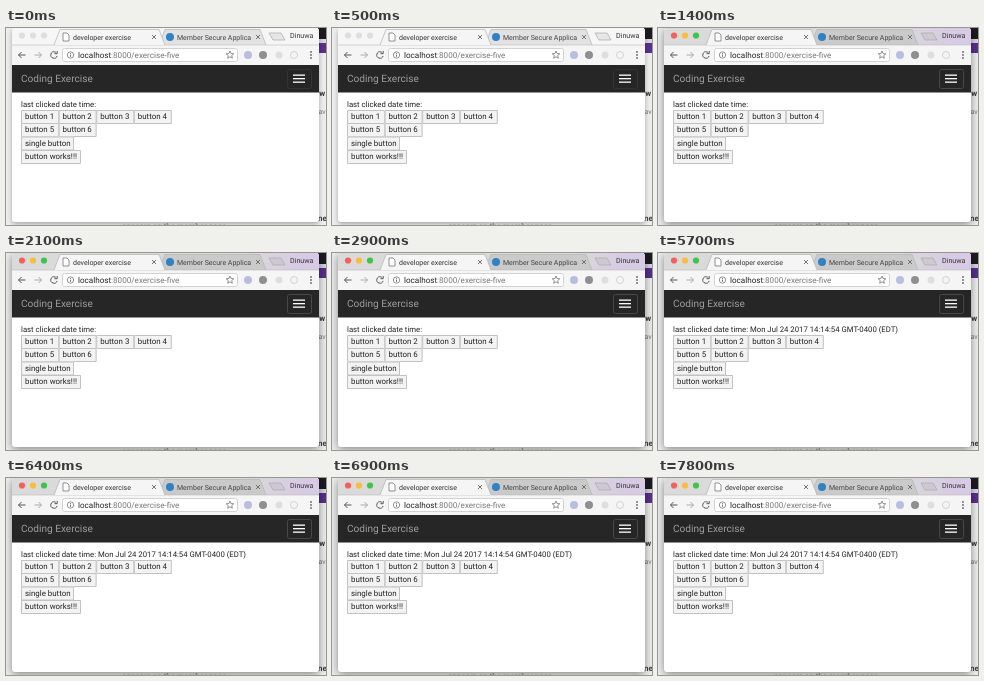
An HTML page with a canvas that plays this animation: 320x197 px, repeating every 8 s.

```html
<!DOCTYPE html>
<html lang="en">
<head>
<meta charset="utf-8">
<title>Coding Exercise</title>
<style>
html, body { margin: 0; width: 100%; height: 100%; overflow: hidden; background: #ddd; }
canvas { display: block; width: 320px; height: 197px; }
</style>
</head>
<body>
<canvas id="stage"></canvas>
<script>
const W = 320, H = 197, LOOP = 8000;
const FOCUS_AT = 1400, CLICK_AT = 4800;
const FONT = 'Roboto, "Liberation Sans", sans-serif';
const canvas = document.getElementById('stage');
const ctx = canvas.getContext('2d');
const dpr = window.devicePixelRatio || 1;
canvas.width = W * dpr;
canvas.height = H * dpr;
ctx.scale(dpr, dpr);
ctx.textRendering = 'geometricPrecision';

function rect(x, y, w, h, color) {
  ctx.fillStyle = color;
  ctx.fillRect(x, y, w, h);
}

function frame(x, y, w, h, color, radius = 0) {
  ctx.beginPath();
  ctx.roundRect(x + .5, y + .5, w - 1, h - 1, radius);
  ctx.strokeStyle = color;
  ctx.lineWidth = 1;
  ctx.stroke();
}

function panel(x, y, w, h, radius, color) {
  ctx.beginPath();
  ctx.roundRect(x, y, w, h, radius);
  ctx.fillStyle = color;
  ctx.fill();
}

function dot(x, y, r, color) {
  ctx.beginPath();
  ctx.arc(x, y, r, 0, Math.PI * 2);
  ctx.fillStyle = color;
  ctx.fill();
}

function arc(x, y, r, from, to, color, width) {
  ctx.beginPath();
  ctx.arc(x, y, r, from, to);
  ctx.strokeStyle = color;
  ctx.lineWidth = width;
  ctx.stroke();
}

function path(points, color, width = 1, fill) {
  ctx.beginPath();
  points.forEach(([x, y], i) => i ? ctx.lineTo(x, y) : ctx.moveTo(x, y));
  if (fill) {
    ctx.fillStyle = fill;
    ctx.fill();
  }
  ctx.strokeStyle = color;
  ctx.lineWidth = width;
  ctx.stroke();
}

function text(str, x, y, size, color = '#222', style = '') {
  ctx.font = `${style} ${size}px ${FONT}`;
  ctx.fillStyle = color;
  ctx.fillText(str, x, y);
}

function cross(x, y) {
  path([[x - 2, y - 2], [x + 2, y + 2]], '#666', .9);
  path([[x + 2, y - 2], [x - 2, y + 2]], '#666', .9);
}

function arrow(x, y, dir, color) {
  path([[x - 3.5 * dir, y], [x + 3.5 * dir, y]], color);
  path([[x + .5 * dir, y - 3], [x + 3.5 * dir, y], [x + .5 * dir, y + 3]], color);
}

function tab(left, right, color) {
  path([[left, 17], [left + 6, 1.5], [right - 6, 1.5], [right, 17]], '#b4b4b4', .7, color);
}

function star(x, y, r) {
  const points = [];
  for (let i = 0; i <= 10; i++) {
    const a = -Math.PI / 2 + i * Math.PI / 5, d = i % 2 ? r * .45 : r;
    points.push([x + d * Math.cos(a), y + d * Math.sin(a)]);
  }
  path(points, '#777', .8);
}

function desktop() {
  rect(0, 0, W, H, '#eee');
  rect(312, 0, 8, 11, '#1c1a20');
  rect(312, 11, 8, 4, '#d9d3e2');
  rect(312, 15, 8, 10, '#5b2d91');
  text('ew', 309, 68, 8, '#333', 'bold');
  text('sav', 309, 86, 7, '#777');
  text('appears on the member page', 116, 201, 8, '#666');
  text('ne', 312, 193, 8, '#444', 'bold');
}

function tabBar(focused) {
  const bar = ctx.createLinearGradient(235, 0, 300, 0);
  bar.addColorStop(0, focused ? '#dadada' : '#f6f6f6');
  bar.addColorStop(1, focused ? '#d6cae4' : '#f6f6f6');
  panel(6, 0, 307, 17, [3, 3, 0, 0], bar);

  const lights = focused ? ['#f7605a', '#f8bd3c', '#3cc44b'] : Array(3).fill('#dedede');
  lights.forEach((color, i) => dot(16 + i * 11, 7.5, 3.1, color));

  tab(153, 260, focused ? '#cacaca' : '#e2e2e2');
  path([[6, 17], [313, 17]], '#bbb', .6);
  tab(48, 159, '#f5f5f5');
  path([[57, 5], [61, 5], [63, 7], [63, 13], [57, 13], [57, 5]], '#777', .8, '#fff');
  text('developer exercise', 67, 11.5, 7, '#333');
  cross(148, 9);
  dot(164, 9, 4, '#3181c3');
  text('Member Secure Applica', 171, 11.5, 7, '#444');
  cross(252, 9);
  path([[263, 5], [275, 5], [279, 12], [267, 12], [263, 5]], '#aaa', .7, focused ? '#cdc8d2' : '#e6e6e6');
  text('Dinuwa', 284, 9.7, 7.1, '#333');
}

function toolbar() {
  rect(6, 17, 307, 20, '#f5f5f5');
  arrow(16, 27, -1, '#555');
  arrow(32, 27, 1, '#aaa');
  arc(48, 27, 3.2, .3, 5.4, '#555', 1);
  path([[51.2, 23], [51.2, 25.7], [48.5, 25.7]], '#555');
  panel(56, 20, 176, 14, 2, '#fff');
  frame(56, 20, 176, 14, '#d2d2d2', 2);
  arc(64.5, 27, 3.2, 0, 7, '#777', .8);
  rect(64.1, 25, .9, .9, '#666');
  rect(64.1, 26.6, .9, 2.2, '#666');
  text('localhost', 72, 29.8, 8.1, '#222');
  text(':8000/exercise-five', 72 + ctx.measureText('localhost').width, 29.8, 8.1, '#777');
  star(224, 27, 4);
  dot(242, 27, 4, '#b9bde0');
  dot(257, 27, 4, '#8f8f8f');
  dot(273, 27, 3.5, '#dedede');
  arc(288, 27, 3.5, 0, 7, '#d2d2d2', 1);
  for (let y = 24; y <= 30; y += 3) dot(305, y, .9, '#666');
}

function browser(focused) {
  ctx.save();
  ctx.shadowColor = focused ? 'rgba(0,0,0,.45)' : 'rgba(0,0,0,.3)';
  ctx.shadowBlur = (focused ? 8 : 5) * dpr;
  ctx.shadowOffsetY = 2 * dpr;
  panel(6, 0, 307, 194, 3, '#fff');
  ctx.restore();
  toolbar();
  tabBar(focused);
}

function button(label, x, y, w) {
  rect(x, y, w, 13.5, '#f3f3f3');
  frame(x, y, w, 14, '#c2c2c2');
  text(label, x + 4, y + 9.2, 7.9);
}

function page(focused, clicked) {
  rect(6, 37, 307, 27.5, '#262626');
  text('Coding Exercise', 15, 54, 10.1, '#9d9d9d');
  frame(281, 41, 25, 20, focused ? '#484848' : '#333', 2);
  for (let y = 46.5; y < 56; y += 3.5) rect(287, y, 12, 1.3, '#fff');

  const date = clicked ? ' Mon Jul 24 2017 14:14:54 GMT-0400 (EDT)' : '';
  text('last clicked date time:' + date, 15, 79, 7.75);
  for (let i = 0; i < 6; i++) {
    button('button ' + (i + 1), 15 + i % 4 * 37.6, i < 4 ? 82 : 95, 38);
  }
  button('single button', 15, 108.5, 53);
  button('button works!!!', 15, 122, 60);
}

function draw(now) {
  const t = now % LOOP, focused = t >= FOCUS_AT;
  ctx.clearRect(0, 0, W, H);
  desktop();
  browser(focused);
  page(focused, t >= CLICK_AT);
  requestAnimationFrame(draw);
}
draw(performance.now());
</script>
</body>
</html>
```
